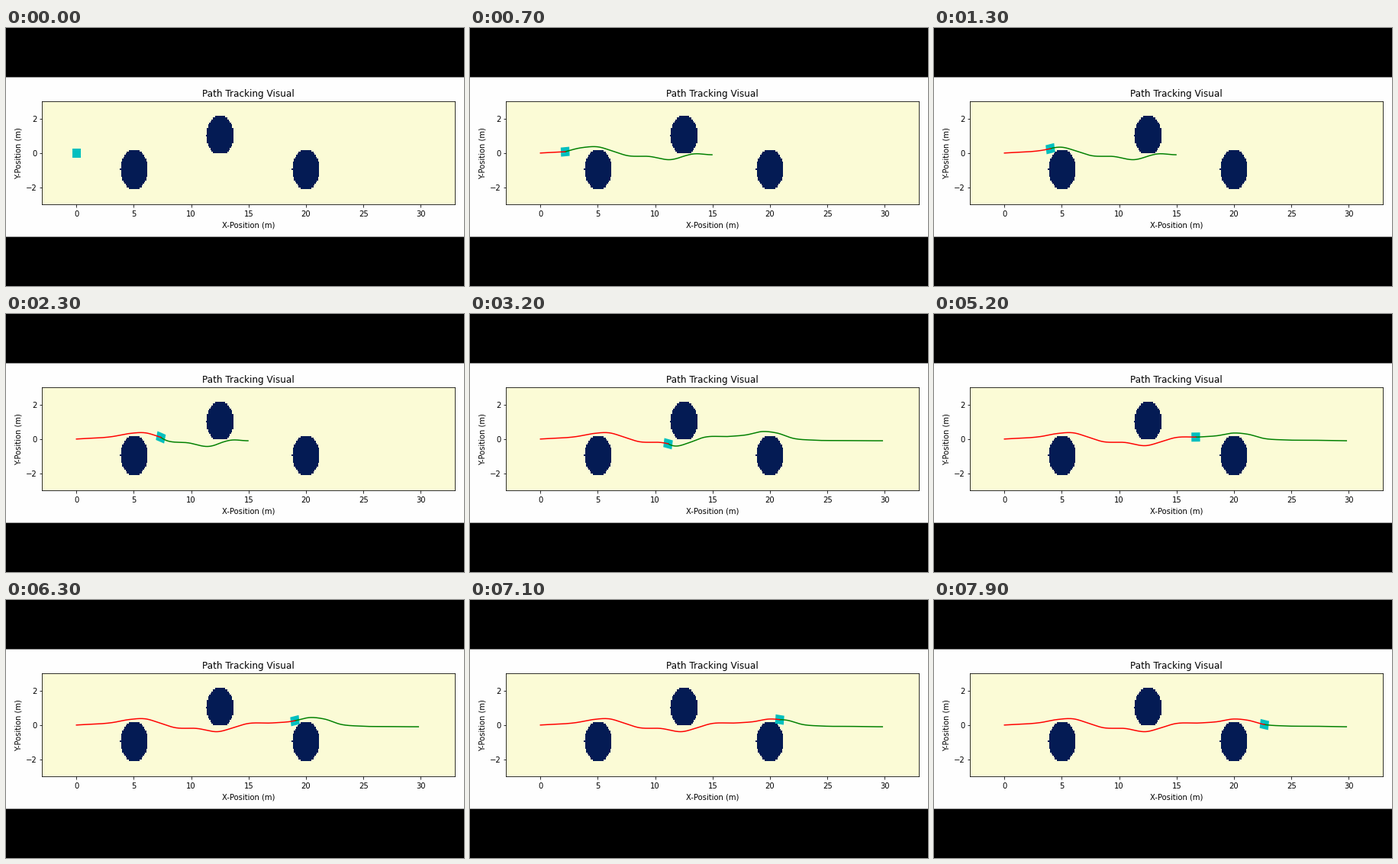
Animation, 600 px wide and 338 px high, one loop 8 s. Source, as a matplotlib script:

```python
import matplotlib.pyplot as plt
import numpy as np
from matplotlib.animation import FuncAnimation
from matplotlib.colors import ListedColormap
from matplotlib.patches import Polygon, Rectangle

W, H, DPI = 600, 338, 72
FRAMES, INTERVAL = 80, 100
SAND, NAVY = "#fbfbd6", "#041b54"
CAR_LENGTH, CAR_WIDTH = 0.75, 0.53

# Frames in which the simulation pauses
HOLDS = [18, 20, 48, 51, 55, 57, 64, 67, 72, 73]

# Key steps: car position, how early the plan turns, how wide it swings
STEPS = [0, 13, 30, 40, 48, 57, 69]
CAR_X = [0, 4.0, 11.12, 14.28, 16.67, 19.04, 22.65]
LEAD = [1, 1, 0.6, 1.1, 0, -0.4, 0]
SWING = [1, 1, 1.25, 1.1, 1, 1.25, 1]

# Weaving line past the obstacles (x, y in metres)
ROUTE = np.array([
    (0, 0), (3.2, .15), (4.6, .32), (6, .36), (7.35, .1), (8.5, -.14),
    (10.5, -.2), (12.4, -.38), (13.6, -.17), (14.8, .07), (17, .12),
    (18.5, .19), (20, .35), (21.2, .28), (22.65, .03), (24.3, -.05),
    (27, -.07), (30, -.08)])
GOAL_Y = -0.1


def route_y(x):
    """Cubic Hermite curve through the route points."""
    px, py = ROUTE.T
    slope = np.gradient(py, px)
    x = np.clip(x, px[0], px[-1])
    k = np.clip(np.searchsorted(px, x, side="right") - 1, 0, len(px) - 2)
    h = px[k + 1] - px[k]
    t = (x - px[k]) / h
    return ((1 + 2 * t) * (1 - t) ** 2 * py[k] + t * (1 - t) ** 2 * h * slope[k]
            + t * t * (3 - 2 * t) * py[k + 1] - t * t * (1 - t) * h * slope[k + 1])


def goal_x(step):
    if step < 22:
        return 14.95
    return 19.7 if step < 28 else 29.8


def plan_at(step, x0):
    """Line from the car to the goal, settling at the goal's height."""
    goal = goal_x(step)
    x = np.linspace(x0, goal, 240)
    lead, swing = (np.interp(step, STEPS, v) for v in (LEAD, SWING))
    y = swing * route_y(x + lead)
    y += (route_y(x0) - y[0]) * np.exp((x0 - x) / 0.7)
    t = np.clip((x - goal + 3) / 3, 0, 1)
    return x, y + (GOAL_Y - y) * t * t * (3 - 2 * t)


def heading(step, x):
    a, b = max(x - 0.4, 0), x + 0.4
    slope = (route_y(b) - route_y(a)) / (b - a)
    return 1.3 * np.arctan(slope) * min(1, step / 3)


def car_corners(x, y, angle):
    box = np.array([(-1, -1), (1, -1), (1, 1), (-1, 1)]) / 2
    c, s = np.cos(angle), np.sin(angle)
    return box * (CAR_LENGTH, CAR_WIDTH) @ np.array([(c, s), (-s, c)]) + (x, y)


def obstacle_grid():
    """Occupancy on cells of 0.1 m; obstacles have a radius of 1.2 m."""
    i, j = np.meshgrid(np.arange(-30, 331), np.arange(-30, 31))
    grid = np.zeros(i.shape)
    for cx, cy in [(50, -10), (125, 10), (200, -10)]:
        disc = (i - cx) ** 2 + (j - cy) ** 2 < 144
        disc |= (i == cx - 12) & (j == cy)
        if cy > 0:
            disc &= j >= 0
        grid[disc] = 1
    return grid


fig = plt.figure(figsize=(W / DPI, H / DPI), dpi=DPI, facecolor="black")
band_top, band_bottom = 64.5, 273.6
fig.add_artist(Rectangle((0, 1 - band_bottom / H), 1,
                         (band_bottom - band_top) / H,
                         color="#fefefe", lw=0, snap=False, zorder=-1))
left, right, top, bottom = 47.2, 588.4, 96.2, 231.4
ax = fig.add_axes([left / W, 1 - bottom / H, (right - left) / W,
                   (bottom - top) / H])
ax.imshow(obstacle_grid(), cmap=ListedColormap([SAND, NAVY]), origin="lower",
          extent=(-3, 33, -3, 3), aspect="auto", interpolation="nearest",
          zorder=0)
ax.set(xticks=range(0, 31, 5), yticks=[-2, 0, 2])
ax.tick_params(axis="x", pad=4)
ax.set_title("Path Tracking Visual", pad=6.4)
ax.set_xlabel("X-Position (m)", labelpad=4.8)
ax.set_ylabel("Y-Position (m)")

car = ax.add_patch(Polygon(car_corners(0, 0, 0), fc="#00bfbf", lw=0, zorder=1))
plan_line, = ax.plot([], [], color="green", lw=1.5, zorder=2)
trail_line, = ax.plot([], [], color="red", lw=1.5, zorder=3)
ax.set(xlim=(-3, 33), ylim=(-3, 3))


def update(frame):
    step = frame - sum(h <= frame for h in HOLDS)
    x = np.interp(step, STEPS, CAR_X)
    car.set_xy(car_corners(x, route_y(x), heading(step, x)))
    if step == 0:
        plan_line.set_data([], [])
        trail_line.set_data([], [])
    else:
        plan_line.set_data(*plan_at(step, x))
        driven = np.linspace(0, x, 240)
        trail_line.set_data(driven, route_y(driven))
    return car, plan_line, trail_line


def reset():
    return update(0)


anim = FuncAnimation(fig, update, frames=FRAMES, interval=INTERVAL,
                     init_func=reset, repeat=True, repeat_delay=0)
plt.show()
```
